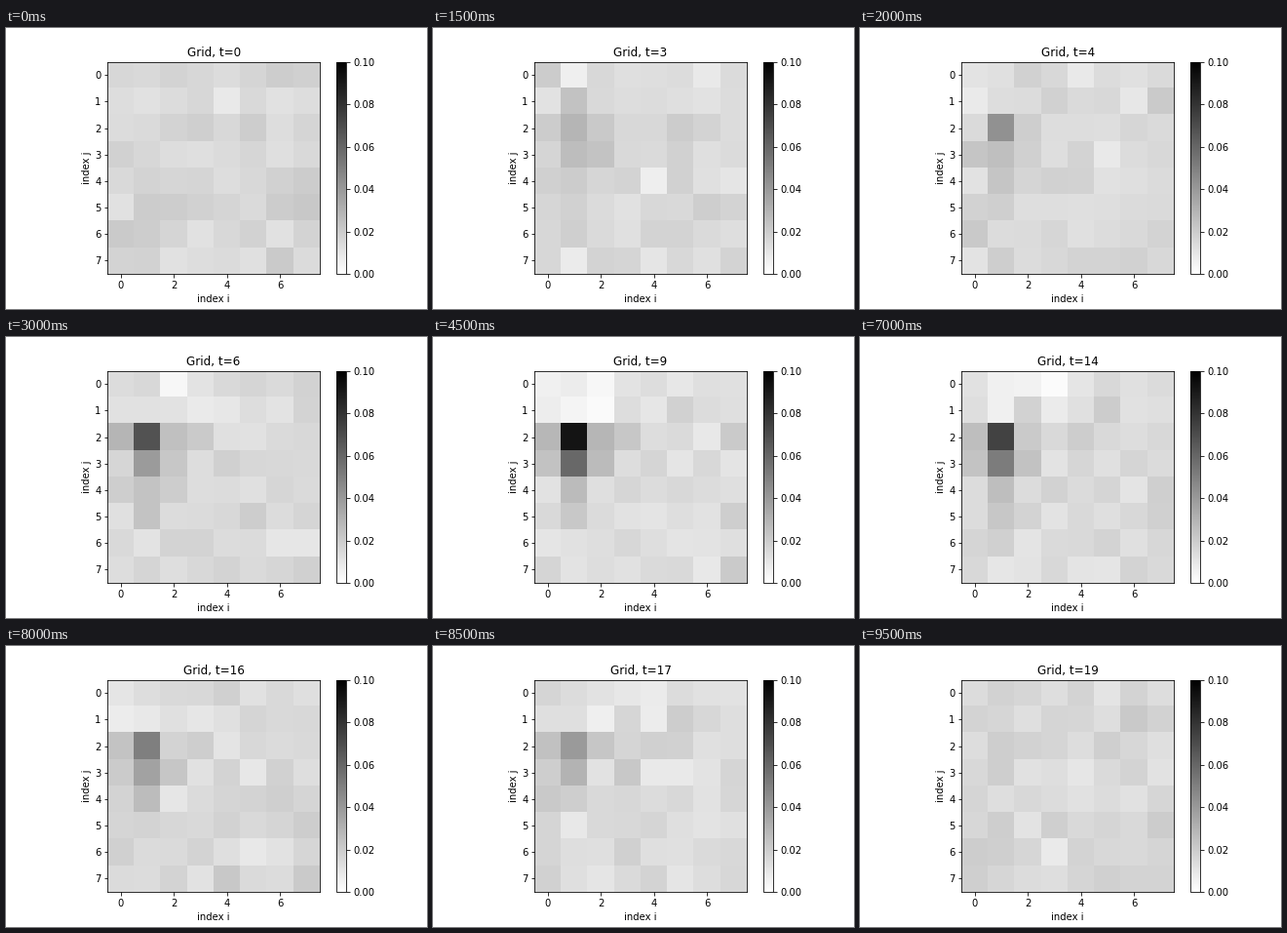
These frames come from a looping animation (432x288 px, 10000 ms). A matplotlib script:

```python
import matplotlib.pyplot as plt
import numpy as np
from matplotlib.animation import FuncAnimation

SIZE, STEPS, PERIOD = 8, 20, 21
MARKED_ROW, MARKED_COLUMN = 2, 1
PEAK, SHADOW, NOISE = 0.078, 0.007, 0.003

plt.rcParams.update({
    "font.family": "DejaVu Sans",
    "font.size": 10,
    "figure.subplot.bottom": 0.125,
})

row, column = np.mgrid[:SIZE, :SIZE]
reach = np.abs(column - MARKED_COLUMN)

# The peak leans down one row; the rows above the marked cell are drained.
fall = np.abs(row - MARKED_ROW - 0.3) - 0.3
peak = PEAK * np.exp(-1.15 * fall - 1.5 * reach)
shadow = -SHADOW * np.exp(-reach / 5)
gain = np.where(row < MARKED_ROW, shadow, peak) - 0.002


def measure(step):
    """Noisy probability of every cell after the given step."""
    swell = np.sin(np.pi * step / PERIOD) ** 2
    noise = np.random.default_rng(step).normal(0, NOISE, (SIZE, SIZE))
    return np.clip(1 / SIZE**2 + swell * gain + noise, 0, None)


fig, ax = plt.subplots(figsize=(6, 4), dpi=72)
image = ax.imshow(measure(0), cmap="gray_r", vmin=0, vmax=0.1,
                  interpolation="nearest")
fig.colorbar(image, ax=ax, ticks=np.linspace(0, 0.1, 6), format="%.2f")
ax.set(xticks=range(0, SIZE, 2), yticks=range(SIZE))
ax.set_xlabel("index i")
ax.set_ylabel("index j", labelpad=3)
title = ax.set_title("Grid, t=0")


def draw(step):
    image.set_data(measure(step))
    title.set_text(f"Grid, t={step}")
    return image, title


animation = FuncAnimation(fig, draw, frames=STEPS, interval=500,
                          init_func=lambda: draw(0), repeat=True,
                          repeat_delay=0)
plt.show()
```
